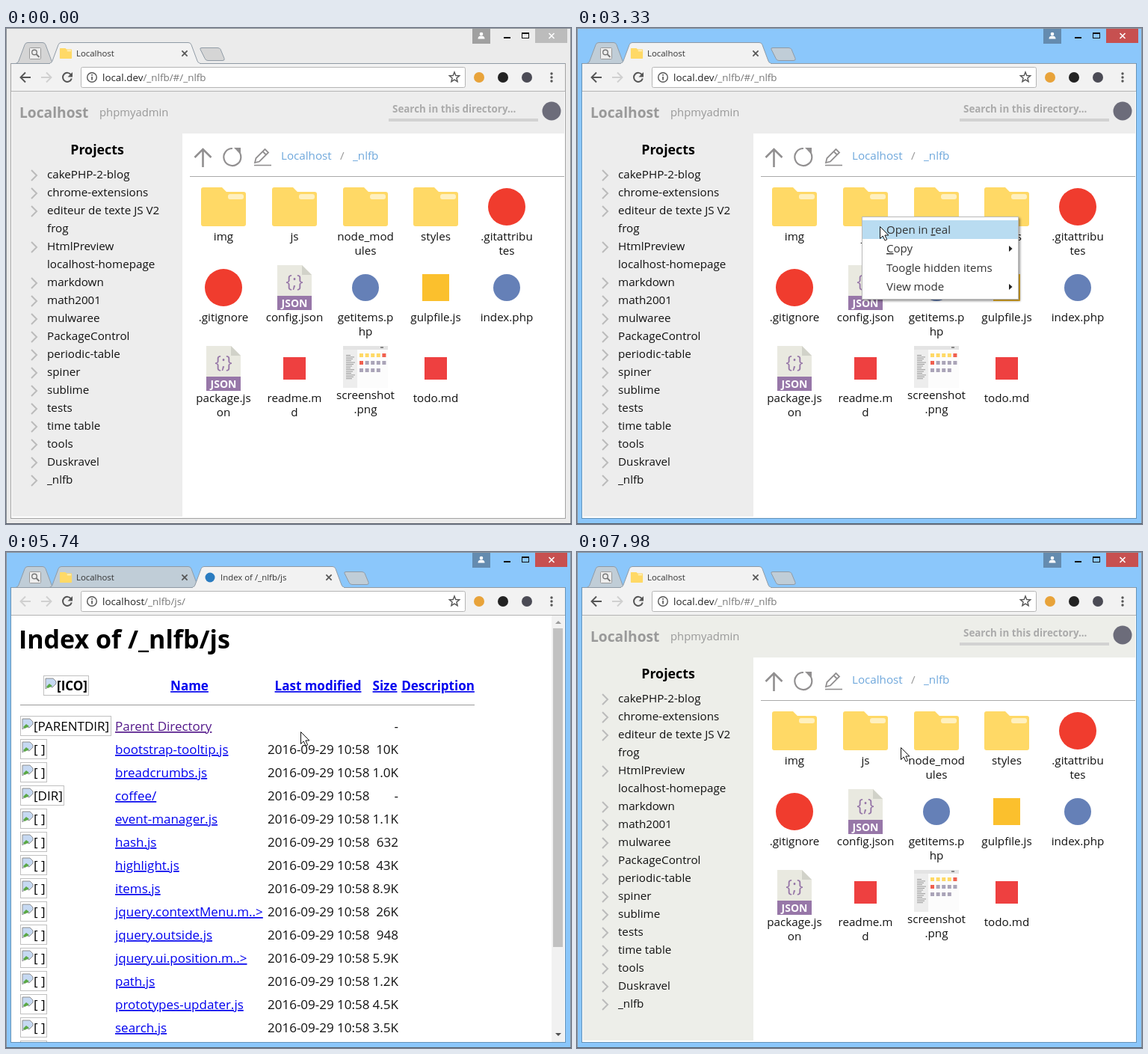
Recreate the animation shown at these times as an HTML page. Size 756 px wide and 663 px high, loop 8 s.

```html
<!DOCTYPE html>
<html lang="en">
<head>
<meta charset="utf-8">
<title>Local file browser</title>
<style>
  html, body { margin: 0; width: 100%; height: 100%; overflow: hidden; background: #ebebeb; }
  svg { display: block; width: 756px; height: 663px; }
  text { font-family: 'Open Sans', 'Noto Sans', sans-serif; white-space: pre; }
  .line { fill: none; }
  .link { text-decoration: underline; }
</style>
</head>
<body>
<svg id="stage" viewBox="0 0 756 663"></svg>
<script>
const LOOP = 8000;
let css = '', tracks = 0;

// Stepped keyframes: stops are [ms, value] pairs in order of time.
function track(selector, prop, stops) {
  const name = 'k' + tracks++;
  const frames = [...stops, [LOOP, stops[stops.length - 1][1]]]
    .map(([ms, value]) => `${ms / LOOP * 100}%{${prop}:${value}}`).join('');
  css += `@keyframes ${name}{${frames}}${selector}{animation:${name} ${LOOP}ms step-end infinite}`;
}

// Visible during [from, to) only, or everywhere else when inverted.
function show(selector, from, to, inside = 1) {
  const stops = [[0, 1 - inside], [from, inside]];
  if (to < LOOP) stops.push([to, 1 - inside]);
  track(selector, 'opacity', stops);
}

const text = (x, y, str, size, fill = '#111', more = '') =>
  `<text x="${x}" y="${y}" font-size="${size}" fill="${fill}" ${more}>${str}</text>`;
const rect = (x, y, w, h, fill, more = '') =>
  `<rect x="${x}" y="${y}" width="${w}" height="${h}" fill="${fill}" ${more}/>`;
const path = (d, fill, more = '') => `<path d="${d}" fill="${fill}" ${more}/>`;
const line = (d, stroke, width = 1, more = '') =>
  `<path class="line" d="${d}" stroke="${stroke}" stroke-width="${width}" ${more}/>`;
const disc = (x, y, r, fill) => `<circle cx="${x}" cy="${y}" r="${r}" fill="${fill}"/>`;
const group = (id, ...parts) => `<g id="${id}">${parts.join('')}</g>`;
const at = (x, y, body, scale = 1) => `<g transform="translate(${x} ${y}) scale(${scale})">${body}</g>`;
const BOLD = 'font-weight="700"', MID = 'text-anchor="middle"', END = 'text-anchor="end"';

const cross = (x, y, r, color, width) =>
  line(`M${x - r} ${y - r}l${2 * r} ${2 * r}m0 ${-2 * r}l${-2 * r} ${2 * r}`, color, width);
const folder = path('M-30-23q0-3 3-3h25l6 6h23q3 0 3 3v40q0 3-3 3h-54q-3 0-3-3z', '#ffd966')
  + rect(6, -17, 21, 7, '#fff0bf', 'rx="3"');

// ---- browser window ----
function windowFrame() {
  return rect(0.5, 0.5, 755, 662, '#ebebeb', 'class="frame" stroke="#8c9299"')
    + line('M0 662.5H756', '#555b66')
    + rect(6.5, 47.5, 742, 608, '#fff', 'class="edge" stroke="#a3a3a3"')
    + rect(624, 1, 24, 20, '#a0a0a0', 'class="user"')
    + disc(636, 8, 2.3, '#fff') + path('M631.5 14.500q0-4 4.500-4t4.500 4z', '#fff')
    + rect(666, 12, 9, 2, '#111')
    + rect(690.5, 6.5, 9, 7, 'none', 'stroke="#111"') + rect(690, 6, 10, 2, '#111')
    + rect(708, 1, 43, 19, '#bcbcbc', 'class="shut"') + cross(730, 10.5, 3.5, '#fff', 1.6);
}

function tab(x, end, active) {
  const d = `M${x} 47.500q3-.5 4-3.500l8-21.500q1-3 4-3H${end - 16}q3 0 4 3l8 21.500q1 3 4 3.500`;
  return path(d, active ? '#f2f2f2' : '#d5d5d5', `stroke="#8f9aa5" ${active ? '' : 'class="idle"'}`)
    + (active ? rect(x + 1, 47, end - x - 2, 2, '#f2f2f2') : '');
}
const closeMark = end => cross(end - 21, 34, 3.6, '#555', 1.7);
const homeTab = active => tab(58, 260, active) + at(80, 34, folder, 0.27)
  + text(94, 38, 'Localhost', 11.4, '#333') + closeMark(260);
const sideTab = (end, active) => tab(249, end, active) + closeMark(end);

const searchTab = tab(13, 65, false)
  + rect(31.5, 26.5, 15, 15, '#eee', 'stroke="#999" rx="1"')
  + `<circle class="line" cx="38" cy="32.500" r="3.300" stroke="#777" stroke-width="1.400"/>`
  + line('M40.5 35l4 4', '#777', 1.8);

const plusTab = group('plus',
  path('M262 26.500h21q3 0 4 2l5 12q1 3-2 3h-20q-3 0-4-3l-6-12q-1-2 2-2z', '#d5d5d5', 'class="idle" stroke="#8f9aa5"'));

const reload = line('M87 62.500a6 6 0 1 0 .8 5', '#555', 2) + path('M89 59v6.500h-6.500z', '#555');
const arrow = (x, dir, color) => line(`M${x + 7 * dir} 66h${-13 * dir}m6.500-6.500`.replace('m6.500-6.500', '')
  + `M${x} 59.500l${-6.5 * dir} 6.500 ${6.5 * dir} 6.500`, color, 1.9);
const url = (host, rest) =>
  `<text x="129" y="71" font-size="13.4" fill="#222">${host}<tspan fill="#777">${rest}</tspan></text>`;

function toolbar() {
  const star = Array.from({ length: 10 }, (_, i) => {
    const r = i % 2 ? 3.1 : 7, a = i * Math.PI / 5;
    return `${(600 + r * Math.sin(a)).toFixed(1)},${(66 - r * Math.cos(a)).toFixed(1)}`;
  }).join(' ');
  return rect(7, 48, 741, 36, '#f2f2f2') + rect(7, 84, 741, 1, '#b4b4b4')
    + rect(100.5, 52.5, 514, 27, '#fff', 'rx="2" stroke="#b5b5b5"')
    + `<circle class="line" cx="115" cy="66" r="6.300" stroke="#555" stroke-width="1.400"/>`
    + rect(114.2, 65, 1.7, 4.5, '#555') + rect(114.2, 62, 1.7, 1.7, '#555')
    + `<polygon class="line" points="${star}" stroke="#555" stroke-width="1.400"/>`
    + disc(633, 66, 7, '#e8a33a') + disc(665, 66, 7, '#222') + disc(697, 66, 7, '#4b4b55')
    + [61, 66, 71].map(y => disc(730, y, 1.7, '#555')).join('')
    + arrow(54, -1, '#d0d0d0')
    + group('homeNav', arrow(26, 1, '#555'), reload, url('local.dev', '/_nlfb/#/_nlfb'))
    + group('waitNav', arrow(26, 1, '#d0d0d0'), cross(82, 66, 5.5, '#555', 2), url('localhost', '/_nlfb/js'))
    + group('listNav', arrow(26, 1, '#d0d0d0'), reload, url('localhost', '/_nlfb/js/'));
}

// ---- file browser page ----
const projects = ['cakePHP-2-blog', 'chrome-extensions', 'editeur de texte JS V2', 'frog', 'HtmlPreview',
  'localhost-homepage', 'markdown', 'math2001', 'mulwaree', 'PackageControl', 'periodic-table', 'spiner',
  'sublime', 'tests', 'time table', 'tools', 'Duskravel', '_nlfb'];
const leaves = ['frog', 'localhost-homepage'];

const square = (r, color) => rect(-r, -r, 2 * r, 2 * r, color);
const icons = {
  folder,
  git: disc(0, 0, 25, '#f03c2e'),
  php: disc(0, 0, 18, '#6580b7'),
  js: square(18, '#fbc02d'),
  md: square(15, '#ee4040'),
  json: path('M-23-30h33l13 13v47h-46z', '#e9e9e0') + path('M10-30l13 13h-13z', '#d1d2c9')
    + rect(-23, 11, 46, 19, '#9777a8')
    + text(0, 26, 'JSON', 14, '#fff', BOLD + MID.padStart(MID.length + 1))
    + text(0, 0, '{;}', 23, '#9777a8', MID),
  shot: rect(-30, -30, 60, 56, '#fcfcfc') + rect(-30, -30, 60, 5, '#e4e4e4') + rect(-30, -25, 19, 51, '#ededed')
    + rect(20, -29, 4, 2, '#888')
    + Array.from({ length: 14 }, (_, i) => rect(-26, -18 + i * 2.4, 6 + i * 5 % 7, 1, '#999')).join('')
    + Array.from({ length: 14 }, (_, i) => rect(-8 + i % 5 * 7.6, -20 + (i / 5 | 0) * 10, 5, 5,
      i < 4 ? '#ffd966' : i < 6 ? '#f0604f' : '#aaa4b8')).join('')
};
const files = [['folder', 'img'], ['folder', 'js'], ['folder', 'node_mod', 'ules'], ['folder', 'styles'],
  ['git', '.gitattribu', 'tes'], ['git', '.gitignore'], ['json', 'config.json'], ['php', 'getitems.p', 'hp'],
  ['js', 'gulpfile.js'], ['php', 'index.php'], ['json', 'package.js', 'on'], ['md', 'readme.m', 'd'],
  ['shot', 'screenshot', '.png'], ['md', 'todo.md']];

function fileCell([icon, ...label], i) {
  const x = Math.round(291 + i % 5 * 94.8), y = 239 + Math.floor(i / 5) * 108;
  const base = y + (icon === 'shot' ? 41 : 45);
  return at(x, y, icons[icon]) + label.map((str, n) => text(x, base + n * 19, str, 15.2, '#111', MID)).join('');
}

function browserPage() {
  const list = projects.map((name, i) => text(55, 201 + 24 * i, name, 15.2)
    + (leaves.includes(name) ? '' : line(`M34 ${190 + 24 * i}l7 7-7 7`, '#bbb', 2))).join('');
  return rect(8, 85, 739, 568, '#ededed', 'class="panel"') + rect(236, 141, 511, 514, '#fff')
    + text(18, 120, 'Localhost', 19.2, '#999', BOLD) + text(125, 118, 'phpmyadmin', 14.8, '#999')
    + text(517, 113, 'Search in this directory...', 13.4, '#ababab', BOLD)
    + rect(512, 121, 200, 4, '#d2d2d2') + disc(730, 111, 12.5, '#6c6c7a')
    + text(122, 169, 'Projects', 17.8, '#000', BOLD + ' ' + MID) + list
    + line('M263.5 186v-24M252.500 173l11-11 11 11', '#918f90', 2.6)
    + line('M310 163.500a11.500 11.500 0 1 1-7-2.500', '#918f90', 2.2) + path('M305 160h9v9z', '#918f90')
    + line('M333 180l1.500-6 12-12 4.500 4.500-12 12zM343.500 165l4.500 4.500', '#918f90', 1.8)
    + line('M332 183.500h23', '#918f90', 1.6)
    + text(368, 176, 'Localhost', 15.2, '#6fa8dc') + text(447, 176, '/', 15.2, '#999')
    + text(464, 176, '_nlfb', 15.2, '#6fa8dc') + rect(246, 198, 501, 1, '#aaa')
    + rect(346, 209, 80, 79, '#e2e9f6', 'id="hover"')
    + files.map(fileCell).join('');
}

// ---- directory listing page ----
const entries = [['PARENTDIR', 'Parent Directory', '-'], [' ', 'bootstrap-tooltip.js', '10K'],
  [' ', 'breadcrumbs.js', '1.0K'], ['DIR', 'coffee/', '-'], [' ', 'event-manager.js', '1.1K'],
  [' ', 'hash.js', '632'], [' ', 'highlight.js', '43K'], [' ', 'items.js', '8.9K'],
  [' ', 'jquery.contextMenu.m..&gt;', '26K'], [' ', 'jquery.outside.js', '948'],
  [' ', 'jquery.ui.position.m..&gt;', '5.9K'], [' ', 'path.js', '1.2K'],
  [' ', 'prototypes-updater.js', '4.5K'], [' ', 'search.js', '3.5K'], [' ', '', '']];
const altWidth = { PARENTDIR: 121, DIR: 58, ICO: 60, ' ': 35 };

const brokenImage = (x, y, alt, more) => rect(x + 0.5, y + 0.5, altWidth[alt], 26, '#fff', 'stroke="#c0c0c0"')
  + path(`M${x + 3} ${y + 4}h10l4 4v3l-5 5-4-2-5 4z`, '#c6d9f2', 'stroke="#8d8d8d"')
  + path(`M${x + 4} ${y + 15}l4-4 4 3-6 3z`, '#5aa845')
  + text(x + 18, y + 20, `[${alt}]`, 17, '#000', more);

function listingPage() {
  const link = (x, y, str, more = '', color = '#0000ee') => text(x, y, str, 17, color, `class="link" ${more}`);
  const heads = [[245.5, 'Name'], [417.5, 'Last modified'], [507, 'Size'], [578, 'Description']]
    .map(([x, str]) => link(x, 185, str, `${BOLD} ${MID}`)).join('');
  const rows = entries.map(([alt, name, size], i) => {
    const y = 239 + 31 * i;
    return brokenImage(19, y - 20, alt) + link(146, y, name, '', i ? '#0000ee' : '#551a8b')
      + (i && name ? text(350, y, '2016-09-29 10:58', 17) : '') + text(525, y, size, 17, '#111', END);
  }).join('');
  return text(17, 129, 'Index of /_nlfb/js', 34, '#000', BOLD)
    + brokenImage(50, 165, 'ICO', BOLD) + heads + rect(19, 204, 608, 1, '#9a9a9a') + rows
    + rect(730, 85, 17, 570, '#f1f1f1') + rect(732, 102, 13, 426, '#c1c1c1')
    + path('M735 96l4-4 4 4z', '#9a9a9a') + path('M735 643l4 4 4-4z', '#505050');
}

function contextMenu() {
  const item = (y, str) => text(414, y, str, 15.05, '#333');
  const u = c => `<tspan class="link">${c}</tspan>`;
  const more = y => path(`M578 ${y - 4}l4.500 4-4.500 4z`, '#222');
  return rect(381.5, 252.5, 209, 110, '#fff', 'stroke="#bbb" filter="url(#drop)"')
    + rect(382, 257, 208, 25, '#b9dcf1', 'id="pick"')
    + item(275, `Open in ${u('r')}eal`) + item(300, `${u('C')}opy`)
    + item(326, 'Toogle hidden items') + item(351, 'View mode') + more(295) + more(346);
}

document.getElementById('stage').innerHTML =
  `<defs><clipPath id="view"><rect x="7" y="85" width="741" height="570"/></clipPath>
   <filter id="drop"><feDropShadow dx="2" dy="2" stdDeviation="1.500" flood-opacity=".4"/></filter></defs>`
  + windowFrame() + toolbar()
  + plusTab + searchTab + group('homeIdle', homeTab(false)) + group('sideClosing', sideTab(411, false))
  + rect(7, 47, 741, 1, '#8f9aa5')
  + group('sideOpening', sideTab(442, true)) + group('sideOpen', sideTab(453, true)) + group('homeActive', homeTab(true))
  + group('waitTitle', line('M270 30q1-2 4-2', '#555', 1.3, 'id="spin"'), text(287, 38, 'Loading...', 11.4, '#333'))
  + group('listTitle', disc(273, 34, 6.5, '#2b7cc0'), text(287, 38, 'Index of /_nlfb/js', 11.4, '#333'))
  + `<g clip-path="url(#view)">${group('home', browserPage())}${group('list', listingPage())}</g>`
  + group('menu', contextMenu())
  + group('cursor', path('M.5.5v16l3.700-3.500 2.800 6 2.700-1.200-2.800-5.800h5z', '#fff', 'stroke="#111"'));

// ---- timing ----
const FOCUS = 1980, MENU = 2500, OPEN = 4360, LOADED = 5040, CLOSE = 7120, GONE = 7290;
const focused = (selector, prop, off, on) => track(selector, prop, [[0, off], [FOCUS, on]]);
focused('.frame', 'fill', '#ebebeb', '#8bc7fb');
focused('.edge', 'stroke', '#a3a3a3', '#6593b8');
focused('.idle', 'fill', '#d5d5d5', '#c0cdd7');
focused('.user', 'fill', '#a0a0a0', '#648baf');
focused('.shut', 'fill', '#bcbcbc', '#c75050');
track('.panel', 'fill', [[0, '#ededed'], [CLOSE, '#edeee9']]);

for (const id of ['#home', '#homeNav', '#homeActive']) show(id, OPEN, CLOSE, 0);
show('#homeIdle', OPEN, CLOSE);
show('#sideOpening', OPEN, 4530);
show('#sideOpen', 4530, CLOSE);
show('#sideClosing', CLOSE, GONE);
for (const id of ['#waitNav', '#waitTitle']) show(id, OPEN, LOADED);
for (const id of ['#list', '#listNav']) show(id, LOADED, CLOSE);
show('#listTitle', LOADED, GONE);
show('#hover', 1640, MENU);
show('#menu', MENU, OPEN);
show('#pick', 3165, OPEN);

css += '#spin{transform-origin:273px 34px}';
track('#spin', 'transform', [0, 1, 2, 3].map(i => [i && OPEN + i * 170, `rotate(${-i * 70}deg)`]));
track('#plus', 'transform', [[0, 0], [OPEN, 183], [4530, 193], [CLOSE, 154], [GONE, 0]]
  .map(([ms, x]) => [ms, `translateX(${x}px)`]));

// Eased move sampled in equal time steps, the first one already under way.
function glide(from, to, start, stop, steps) {
  return Array.from({ length: steps }, (_, i) => {
    const t = (i + 1) / steps, ease = t * t * (3 - 2 * t);
    const [x, y] = from.map((v, axis) => Math.round(v + (to[axis] - v) * ease));
    return [Math.round(start + (stop - start) * i / (steps - 1)), x, y];
  });
}
const pointer = [
  [0, -40, -40], [170, 615, 650],
  ...glide([615, 650], [378, 249], 780, 1810, 7),
  ...glide([378, 249], [405, 265], 3000, 3330, 3),
  [5210, 400, 256], [5380, 395, 246], [5550, 394, 243], [5740, 394, 240],
  ...glide([394, 240], [390, 52], 5900, 6590, 5),
  [6770, 388, 37], [7460, 389, 48], [7620, 393, 98], [7790, 404, 187], [7980, 433, 261]
];
track('#cursor', 'transform', pointer.map(([ms, x, y]) => [ms, `translate(${x}px,${y}px)`]));

document.head.appendChild(document.createElement('style')).textContent = css;
</script>
</body>
</html>
```
